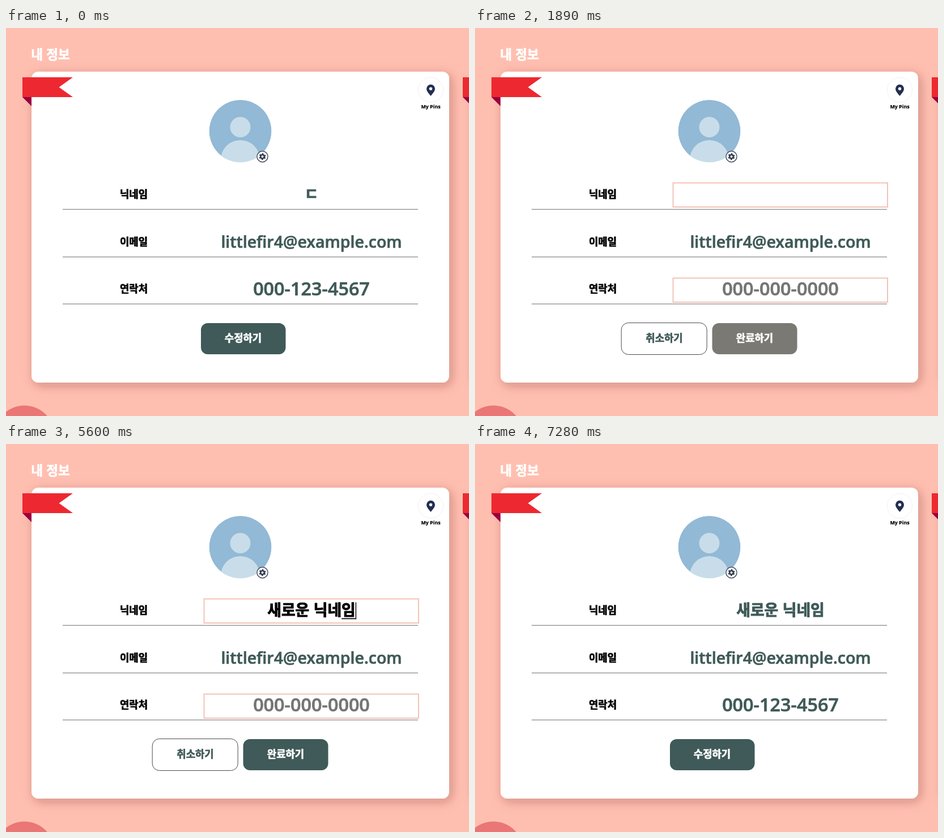
Write an HTML page that moves like this. It is 817x685 px and loops after 7630 ms.

```html
<!DOCTYPE html>
<html lang="ko">
<head>
<meta charset="utf-8">
<title>내 정보</title>
<style>
  html, body { margin: 0; width: 100%; height: 100%; overflow: hidden; background: #ffbfb0; }
  svg { display: block; width: 817px; height: 685px; }
  text {
    white-space: pre; text-anchor: middle;
    font-family: "Noto Sans CJK KR", "Noto Sans CJK", sans-serif; font-weight: 900;
    color: #000; fill: currentColor; stroke: currentColor; stroke-width: .7; stroke-linejoin: round;
  }
  .label, .button { font-size: 17.8px; }
  .value { font-size: 26.8px; stroke-width: 1; }
  .latin { font-family: "Open Sans", "Noto Sans", sans-serif; font-weight: 600; }
  .phone { font-size: 32.4px; }
  .pins { font-size: 8.9px; font-weight: 700; stroke-width: .2; }
  .green { color: #3f5a58; }
  .white { color: #fff; }
  .gray { color: #757575; }
  .box { fill: none; stroke: #f3c3b7; stroke-width: 2; }
</style>
</head>
<body>
<svg viewBox="0 0 817 685">
  <defs>
    <filter id="shadow" x="-10%" y="-10%" width="120%" height="120%">
      <feDropShadow dx="4" dy="5" stdDeviation="10" flood-color="#5a2018" flood-opacity=".3"/>
    </filter>
    <clipPath id="face"><circle cx="413.5" cy="182" r="55"/></clipPath>
    <g id="card">
      <rect x="45" y="77" width="737" height="549" rx="12" fill="#fff" filter="url(#shadow)"/>
      <path d="M29 122H45V138Z" fill="#990041"/>
      <path d="M29 87H118L93.5 104.5L118 122H29Z" fill="#ee2830"/>
    </g>
  </defs>

  <rect width="817" height="685" fill="#ffbfb0"/>
  <circle cx="32.5" cy="719.5" r="53" fill="#ea7676"/>
  <text class="white" x="78.5" y="55" font-size="22.6">내 정보</text>
  <use href="#card"/>
  <use href="#card" x="777"/>

  <circle cx="749.5" cy="109" r="22" fill="#fff" stroke="#f1f1f3"/>
  <path d="M749.5 120C745 114.5 742 110.8 742 107.2A7.5 7.5 0 0 1 757 107.2C757 110.8 754 114.5 749.5 120Z" fill="#232f50"/>
  <circle cx="749.5" cy="107.3" r="2.7" fill="#fff"/>
  <text class="latin pins" x="749.5" y="142">My Pins</text>

  <g clip-path="url(#face)">
    <circle cx="413.5" cy="182" r="55" fill="#92b9d6"/>
    <circle cx="413.5" cy="175" r="18" fill="#c8dde9"/>
    <ellipse cx="413.5" cy="232" rx="34.5" ry="34" fill="#c8dde9"/>
  </g>
  <g transform="translate(452.5 227)" fill="none" stroke="#303b4e">
    <circle r="9.6" fill="#fff" stroke-width="1.3"/>
    <circle r="3.3" stroke-width="2.6"/>
    <circle r="5" stroke-width="2" stroke-dasharray="2.6 2.636" stroke-dashoffset="-1.318"/>
  </g>

  <path d="M100 320.2H727M100 404.2H727M100 487.2H727" stroke="#9b9b9d" stroke-width="1.5"/>
  <text class="label" x="225.5" y="300">닉네임</text>
  <text class="label" x="225.5" y="384">이메일</text>
  <text class="label" x="225.5" y="466.5">연락처</text>
  <text class="latin green" x="539" y="388" font-size="28.5">littlefir4@example.com</text>

  <g id="view">
    <text id="nickname" class="value green" x="539" y="303"></text>
    <text class="latin phone green" x="539" y="471.5">000-123-4567</text>
    <rect id="edit" x="344" y="521" width="149.5" height="55" rx="12"/>
    <text class="button white" x="418.5" y="553.5">수정하기</text>
  </g>

  <g id="form">
    <rect class="box" x="349.5" y="273.5" width="378.5" height="42.5"/>
    <rect class="box" x="349.5" y="441.5" width="378.5" height="42.5"/>
    <text id="typed" class="value" x="539" y="303"></text>
    <rect id="underline" y="307.5" height="1.7"/>
    <rect id="caret" y="279.5" width="1.4" height="30"/>
    <text class="latin phone gray" x="539" y="471.5">000-000-0000</text>
    <rect id="cancel" x="258.2" y="520.5" width="151" height="56" rx="12.5" stroke="#4a4a50"/>
    <text class="button green" x="334" y="553.5">취소하기</text>
    <rect id="done" x="418.5" y="521" width="150" height="55" rx="12"/>
    <text id="doneLabel" class="button white" x="493.5" y="553.5">완료하기</text>
    <g id="spinner">
      <circle cx="493" cy="549" r="10" fill="#fff" fill-opacity=".25"/>
      <path id="wedge" d="M0 0L-7.071 7.071A10 10 0 0 1 -7.071 -7.071Z" fill="#fff"/>
    </g>
  </g>
</svg>
<script>
const LOOP = 7630, STEP = 70, FADE = 500, CENTER = 539;
const GREEN = [63, 90, 88], PINK = [255, 191, 176], WHITE = [255, 255, 255];

// Moments of the interaction, in ms
const HOVER_EDIT = 960, OPEN_FORM = 1280, LEAVE_DONE = 1690, FOCUS = 2800,
      HOVER_DONE = 5640, SUBMIT = 5950, SAVED = 6790;

// Input text after each keystroke of the Korean composition
const keystrokes = [
  [3150, 'ㅅ'], [3220, '새'], [3360, '새ㄹ'], [3430, '새로'], [3500, '새롱'],
  [3570, '새로우'], [3640, '새로운'], [3710, '새로운 '], [3780, '새로운 ㄴ'],
  [3990, '새로운 니'], [4060, '새로운 닉'], [4200, '새로운 닉ㄴ'], [4270, '새로운 닉네'],
  [4410, '새로운 닉넹'], [4480, '새로운 닉네이'], [4550, '새로운 닉네임']
];

const el = Object.fromEntries([...document.querySelectorAll('svg > g[id], g[id] [id]')].map(e => [e.id, e]));
const show = (e, on) => e.style.display = on ? '' : 'none';
const mix = (a, b, k) => a.map((v, i) => v + (b[i] - v) * k);
const paint = (e, color) => e.setAttribute('fill', `rgb(${color.map(Math.round)})`);

// cubic-bezier(.25, .1, .25, 1)
function ease(x) {
  if (x <= 0) return 0;
  if (x >= 1) return 1;
  let lo = 0, hi = 1, s;
  for (let i = 0; i < 20; i++) {
    s = (lo + hi) / 2;
    const bx = .75 * s * (1 - s) ** 2 + .75 * s * s * (1 - s) + s ** 3;
    if (bx < x) lo = s; else hi = s;
  }
  return .3 * s * (1 - s) ** 2 + 3 * s * s * (1 - s) + s ** 3;
}
const fade = (t, start) => ease((t - start) / FADE);
const editColor = t => mix(GREEN, PINK, fade(t, HOVER_EDIT));

function donePinkness(t) {
  if (t < LEAVE_DONE) return fade(t, OPEN_FORM);
  if (t < HOVER_DONE) return fade(LEAVE_DONE, OPEN_FORM) * (1 - fade(t, LEAVE_DONE));
  return fade(t, HOVER_DONE);
}

function drawInput(t) {
  const key = keystrokes.findLast(([at]) => t >= at);
  const text = key ? key[1] : '';
  el.typed.textContent = text;

  const width = text ? el.typed.getComputedTextLength() : 0;
  const end = CENTER + width / 2;
  const focused = t >= FOCUS && t < SUBMIT;
  const blinkOff = t >= 5040 && t < 5600;
  show(el.caret, focused && !blinkOff);
  el.caret.setAttribute('x', end);

  const composing = focused && text && !text.endsWith(' ');
  show(el.underline, composing);
  if (composing) {
    const last = el.typed.getSubStringLength(text.length - 1, 1);
    el.underline.setAttribute('x', end - last);
    el.underline.setAttribute('width', last);
  }
}

function draw(t) {
  const editing = t >= OPEN_FORM && t < SAVED;
  show(el.form, editing);
  show(el.view, !editing);
  if (!editing) {
    const saved = t >= SAVED;
    el.nickname.textContent = saved ? '새로운 닉네임' : 'ㄷ';
    paint(el.edit, saved ? mix(WHITE, GREEN, fade(t, SAVED - 20)) : editColor(t));
    return;
  }
  drawInput(t);
  paint(el.cancel, mix(editColor(OPEN_FORM), WHITE, fade(t, OPEN_FORM)));
  paint(el.done, mix(GREEN, PINK, donePinkness(t)));
  const loading = t >= SUBMIT;
  show(el.doneLabel, !loading);
  show(el.spinner, loading);
  const angle = (t - SUBMIT) / 1100 * 360;
  el.wedge.setAttribute('transform', `translate(493 549) rotate(${angle})`);
}

function frame() {
  const t = performance.now() % LOOP;
  draw(Math.floor(t / STEP) * STEP);
  requestAnimationFrame(frame);
}
frame();
</script>
</body>
</html>
```
